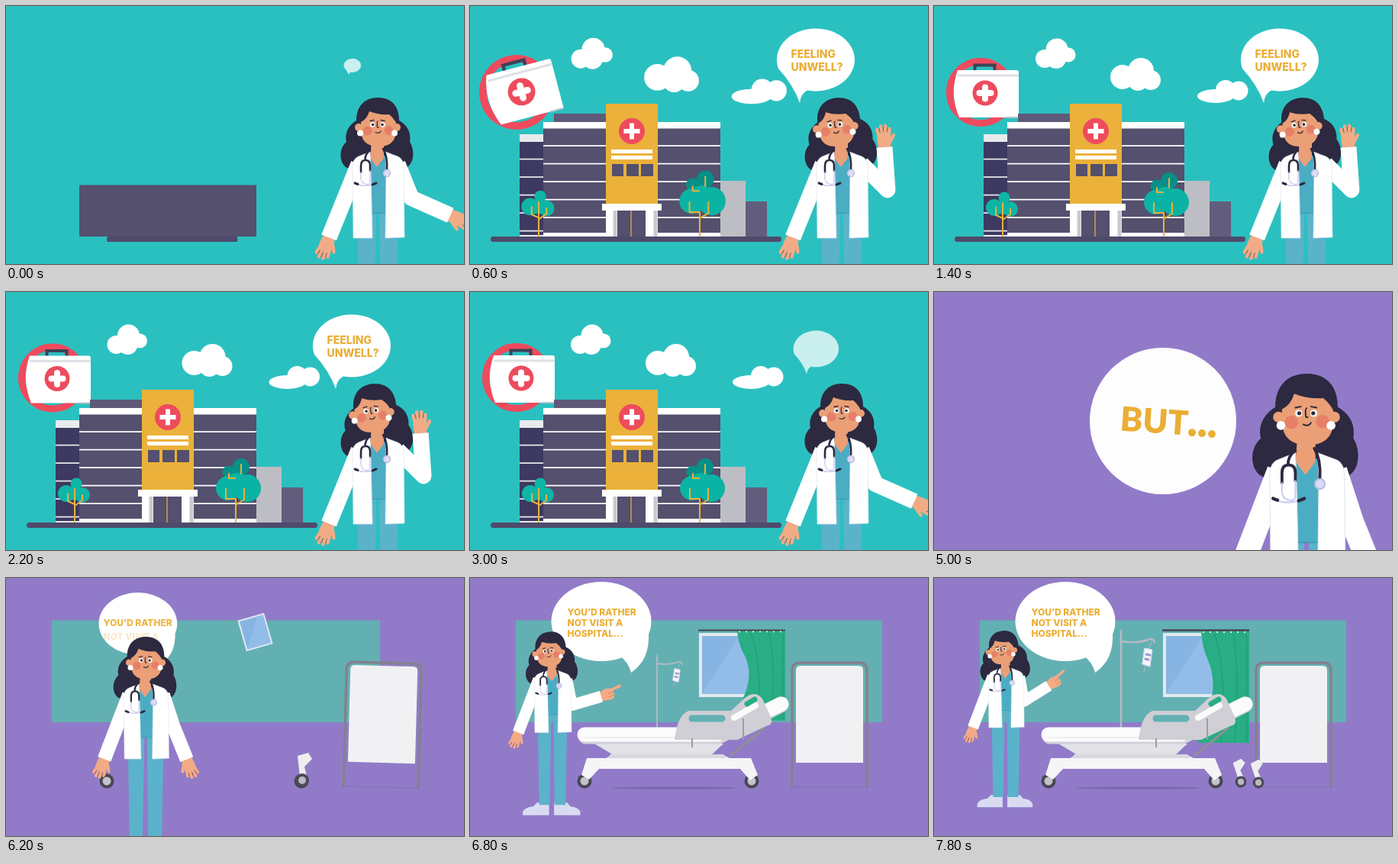
An HTML page for the animation above (8 s loop, 600 by 338 pixels).

```html
<!DOCTYPE html>
<html lang="en">
<head>
<meta charset="utf-8">
<title>Feeling unwell</title>
<style>
html, body { margin: 0; width: 100%; height: 100%; overflow: hidden; background: #917bc9; }
svg { display: block; width: 100%; height: 100%; }
text { fill: #ebae35; font-family: Inter, sans-serif; font-weight: 800; }
.line { fill: none; stroke-linecap: round; stroke-linejoin: round; }
.sleeve { fill: none; stroke: #fff; stroke-width: 21; stroke-linejoin: round; }
</style>
</head>
<body>
<svg viewBox="0 0 600 338">
<defs>
  <g id="hand">
    <path fill="#f3ab86" d="M-8 -1H8L9 12Q8 19 0 19T-9 12Z"/>
    <path class="line" stroke="#f3ab86" stroke-width="4.4" d="M-6 13L-8 24M-2 15L-3 28M2.500 15L3 28M6.500 12L8 24M7 5L13 15"/>
    <path class="line" stroke="#8d5a50" d="M-4.500 20L-5.500 25M0 21V27M5 20L5.500 25"/>
  </g>
  <g id="caster">
    <path fill="#eee" d="M-6 -32L8 -36L13 -28L3 -18L6 -4H-3Z"/>
    <circle r="9" fill="#4b4a55"/><circle r="5" fill="#b9b9c2"/>
  </g>
  <g id="wheel"><circle r="9.500" fill="#484751"/><circle r="5.500" fill="#c3c3ca"/></g>
</defs>

<g id="clinic">
  <rect width="600" height="338" fill="#2bc0c0"/>
  <g fill="#fff">
    <g id="cloud0"><circle cx="161" cy="57" r="14.500"/><circle cx="145" cy="69" r="12"/><circle cx="160" cy="69" r="13"/><circle cx="176" cy="64" r="9.500"/></g>
    <g id="cloud1"><circle cx="271" cy="85" r="17"/><circle cx="247" cy="93" r="16"/><circle cx="267" cy="98" r="13"/><circle cx="284" cy="97" r="13"/></g>
    <g id="cloud2"><circle cx="382" cy="110" r="13"/><circle cx="399" cy="111" r="12.500"/><ellipse cx="369" cy="118" rx="24" ry="9"/></g>
  </g>
  <g id="kit">
    <circle cx="61" cy="113" r="40.500" fill="none" stroke="#ee4b5d" stroke-width="9"/>
    <path d="M53.500 85V77.500H79.500V85" fill="none" stroke="#3c4258" stroke-width="4"/>
    <path fill="#fff" d="M31 84H108Q111 84 111 87V146H33Q20 115 31 84Z"/>
    <path d="M31 91H111" stroke="#dde1e6" stroke-width="3"/><path d="M94 146H110" stroke="#b7c3c9" stroke-width="2"/>
    <circle cx="67" cy="114" r="16.500" fill="#ee4b5d"/>
    <path class="line" stroke="#fff" stroke-width="8" d="M59.500 114H74.500M67 106.500V121.500"/>
  </g>
  <g id="sides">
    <rect x="65" y="168" width="32" height="134" fill="#e9eaee"/>
    <path d="M81 178V300" stroke="#3d3961" stroke-width="32" stroke-dasharray="21.700 1.800"/>
    <rect x="110" y="141" width="68" height="12" fill="#5f5a79"/>
    <rect x="328" y="229" width="33" height="73" fill="#bdbec4"/>
    <rect x="361" y="256" width="28" height="46" fill="#625d7c"/>
  </g>
  <g id="walls">
    <rect x="96" y="152" width="232" height="150" fill="#54506d"/>
    <g id="floors">
      <rect x="96" y="152" width="232" height="150" fill="#fff"/>
      <path d="M212 160.500V297" stroke="#54506d" stroke-width="232" stroke-dasharray="21.700 1.800"/>
    </g>
  </g>
  <g id="tower">
    <rect x="178" y="128" width="68" height="134" fill="#ebb13a"/>
    <circle cx="212" cy="164" r="17" fill="#ee4b5d"/>
    <path d="M201.500 164H222.500M212 153.500V174.500" stroke="#fff" stroke-width="6"/>
    <path d="M185 190.500H239M185 198.500H239" stroke="#fff" stroke-width="5"/>
    <path d="M186 215H201M205 215H221M224 215H240" stroke="#54506d" stroke-width="16"/>
    <rect x="178" y="267" width="68" height="35" fill="#fff"/>
    <rect x="193" y="267" width="37" height="35" fill="#54506d"/>
    <path d="M190 268V302M243 268V302" stroke="#c9cad0" stroke-width="5"/>
    <path d="M211 268V302" stroke="#d39a5c" stroke-width="1.500"/>
    <rect x="173" y="259" width="78" height="9" fill="#fff"/>
  </g>
  <g id="smallTree" fill="#0eb5a5">
    <circle cx="92" cy="251" r="7.500"/><circle cx="79" cy="264" r="11"/><circle cx="100" cy="266" r="10"/><circle cx="90" cy="264" r="9"/>
    <path class="line" stroke="#e9b13c" stroke-width="2" d="M90 301V258M81 264V274L90 278M100 266V273L90 280"/>
  </g>
  <g id="bigTree" fill="#0bb3a4">
    <circle cx="308" cy="229" r="11" fill="#078f88"/><circle cx="292" cy="236" r="8.500" fill="#078f88"/>
    <circle cx="291" cy="257" r="16"/><circle cx="316" cy="257" r="18"/><circle cx="303" cy="252" r="15"/>
    <path class="line" stroke="#e9b13c" stroke-width="2" d="M301 301V277M288 258V271H301V277M312 258V272L301 279M292 238V244H300M308 226V238"/>
  </g>
  <rect id="ground" x="27" y="302" width="381" height="7" rx="3.500" fill="#4f4a6b"/>
  <g id="askBubble">
    <path fill="#fff" d="M404 82Q424 104 432 127Q433 115 442 110.500A51 41 0 1 0 404 82Z"/>
    <g id="askText" font-size="14" style="font-weight: 900"><text x="420.500" y="68">FEELING</text><text x="420.500" y="84.500">UNWELL?</text></g>
  </g>
</g>

<g id="but">
  <circle id="flash" cx="300" cy="169" fill="#fff"/>
  <circle id="violet" cx="300" cy="169" fill="#917bc9"/>
  <circle id="disc" cx="300" cy="169" fill="#fdfdfe"/>
  <g id="butText">
    <text x="244" y="186" font-size="44" style="font-family: Lato, sans-serif; font-weight: 900">BUT</text>
    <g fill="#ebae35"><circle id="dot0" cx="339" cy="182" r="5"/><circle id="dot1" cx="352" cy="182" r="5"/><circle id="dot2" cx="365" cy="182" r="5"/></g>
  </g>
</g>

<g id="room">
  <rect id="wall" x="60" y="55.500" width="480" height="133.500" fill="#63b0b2"/>
  <g id="window">
    <rect x="302" y="74" width="68" height="80" fill="#86b5e3" stroke="#e4e9f0" stroke-width="4"/>
    <path d="M304 152L352 76H368V152Z" fill="#92bde8"/>
  </g>
  <g id="curtain">
    <path fill="#28ad84" d="M350 70H413V216H345Q352 196 359 176Q372 138 359 108Q351 90 350 70Z"/>
    <path class="line" stroke="#1f8f6d" stroke-dasharray="3 2" d="M368 74Q384 125 376 214M392 74Q401 130 394 214M410 76V214"/>
    <path d="M299 68.500H413" stroke="#45464f" stroke-width="2.500"/><path d="M352 71H411" stroke="#dceee7" stroke-width="2" stroke-dasharray="2 7"/>
  </g>
  <g id="screen">
    <path d="M422 275V121Q422 111 432 111H510Q520 111 520 121V275" fill="none" stroke="#83828e" stroke-width="3.500"/>
    <path d="M420 274H522" stroke="#8171b5"/>
    <path d="M427 242V121Q427 115 433 115H509Q515 115 515 121V242Z" fill="#f1f1f3"/>
  </g>
  <g id="drip" class="line" stroke="#b5bac2" stroke-width="2.500">
    <path d="M245 195V69M245 83Q266 86 280 81Q287 78 289 84"/>
    <path d="M285 84L281 94M277 115L275 123" stroke-width="1"/>
    <path d="M276 92L286 94L283 116L273 113Z" fill="#f4f4fb" stroke="#dad8ec" stroke-width="1"/><path d="M278 100L283 101M277 106L281 107" stroke="#9c9ad0" stroke-width="3"/>
  </g>
  <ellipse id="shade" cx="268" cy="275" rx="82" ry="1.800" fill="#7c69b0"/>
  <use id="wheelL" href="#wheel"/><use id="wheelR" href="#wheel"/>
  <use id="looseCaster" href="#caster" x="388" y="265"/>
  <g id="bed">
    <path d="M340 234L386 196" stroke="#8e8e98" stroke-width="3"/>
    <path fill="#e2e2e7" d="M163 217H332L316 232H188Z"/>
    <path fill="#f5f5f7" d="M153 236H178L188 231H330L340 236H368L377 258L367 265L354 250H169L156 264L146 258Z"/>
    <path fill="#d8d8de" d="M184 231H332L336 236H180Z"/>
    <path class="line" stroke="#d2d2d9" stroke-width="21" d="M152 207H326L407 166"/>
    <path class="line" stroke="#fbfbfc" stroke-width="19" d="M150 205H324L408 165"/>
    <path d="M150 209H320" stroke="#e4e4e9"/>
    <path fill="#cfcfd5" d="M268 212Q272 178 287 174H342L359 158Q373 146 383 158L393 180Q399 192 388 194L350 212Z"/>
    <path class="line" stroke="#63b0b2" stroke-width="9" d="M291 184H330"/>
    <path class="line" stroke="#fbfbfc" stroke-width="8" d="M346 183L374 167"/>
    <path class="line" stroke="#28ad84" stroke-width="7" d="M363 165L373 159"/>
    <path d="M291 210V222M358 184V212" stroke="#9c9ca5" stroke-width="2"/>
  </g>
  <g id="casters"><use href="#caster" transform="translate(402 267) scale(.82) rotate(-12)"/><use href="#caster" transform="translate(425 268) scale(.82) rotate(-12)"/></g>
  <g id="tellBubble" fill="#fff">
    <ellipse cx="172" cy="57" rx="65.500" ry="52"/>
    <path d="M192 98Q208 110 211 124Q236 107 234 72Z"/>
  </g>
  <g id="tellText" font-size="12"><text x="127.500">YOU’D RATHER</text><text x="127.500">NOT VISIT A</text><text x="127.500">HOSPITAL...</text></g>
</g>

<g id="doctor">
  <path id="hair" fill="#2c2940" d="M487 120C470 120 459 131 459 150C449 156 443 167 446 178C435 187 436 209 449 213C460 217 470 206 487 206C505 206 512 218 524 212C536 206 535 187 529 178C531 166 526 156 515 150C515 131 505 120 487 120Z"/>
  <path fill="#d9dcf1" d="M433 455V449Q437 440 452 439L459 432H481V455ZM538 455V449Q534 440 520 439L514 432H490V455Z"/>
  <path fill="#5bb3cb" d="M460 262H514L511 436H491L489 270H485L482 436H463Z"/>
  <path fill="#4badc3" d="M474 196H501L500 271H474Z"/><path d="M477 271.500H499" stroke="#3b98af"/>
  <path fill="#ea9f76" d="M479 176H495V199L486 211L477 199Z"/>
  <use id="handL" href="#hand"/><use id="handR" href="#hand"/>
  <g id="pointing">
    <path fill="#f3ab86" d="M-8 -1H8L11 10Q11 24 2 24H-5Q-12 22 -10 12Z"/>
    <path class="line" stroke="#f3ab86" stroke-width="5" d="M6 17L9 38"/>
    <path class="line" stroke="#c77c5d" d="M-5 14L-4 22M1 14L2 22"/>
  </g>
  <path class="sleeve" id="armL"/><path class="sleeve" id="armR"/>
  <g fill="#fff" stroke="#dfe4ef" stroke-width=".7">
    <path d="M477 191L462 197Q454 200 454 211L455 304H480L478 217Z"/>
    <path d="M497 191L513 197Q521 200 521 212L522 303L497 304L498 217Z"/>
  </g>
  <g class="line" stroke="#2c2940" stroke-width="2.600">
    <path d="M477 189Q470 194 470.500 202M465 218V209Q465 202 471 202T477 209V216M494 187Q500 197 499 214"/>
    <path d="M465 218Q464 230 468 232Q475 236 477 231V216M458 233Q470 238 483 233" stroke="#cbcdf0" stroke-width="1.400"/>
    <path d="M457 232L461 233.500M480 234L485 232" stroke-width="3"/>
    <circle cx="499" cy="219" r="4.500" fill="#dcdcf4" stroke="#b9bde3" stroke-width="1.500"/>
  </g>
  <g id="face">
    <g fill="#ea9f76">
      <circle cx="462" cy="159" r="5"/><circle cx="512" cy="159" r="5"/>
      <path d="M476 138Q488 143 502 142Q508 147 511 153V164Q510 184 488 184Q466 184 465 164V152Q473 148 476 138Z"/>
    </g>
    <g fill="#e77f68"><circle cx="473.500" cy="163.500" r="6"/><circle cx="501.500" cy="163" r="6"/></g>
    <g fill="#fff"><circle cx="464" cy="166.500" r="4"/><circle cx="509" cy="166.500" r="4"/><circle cx="480" cy="155.500" r="3.200"/><circle cx="493.500" cy="155.500" r="3.200"/></g>
    <g fill="#2c2940"><circle cx="480.500" cy="155.500" r="1.800"/><circle cx="493" cy="155.500" r="1.800"/></g>
    <path class="line" stroke="#2c2940" stroke-width="1.300" d="M477 150.500L482 149.500M491 149.500L496 150.500M487 151Q485.500 152 486.500 159H488M484 165.500Q489 168 491 164"/>
  </g>
</g>
</svg>
<script>
const LOOP = 8000, STEP = 200;
const $ = id => document.getElementById(id);
const set = (id, name, value) => $(id).setAttribute(name, value);
const show = (id, on) => set(id, 'display', on ? 'inline' : 'none');
const mix = (a, b, p) => a + (b - a) * p;

let t = 0;
const progress = (from, to) => Math.min(1, Math.max(0, (t - from) / (to - from)));
const ease = (from, to) => { const p = progress(from, to); return p * p * (3 - 2 * p); };
const pop = (from, to) => { const q = progress(from, to) - 1; return 1 + 2.7 * q ** 3 + 1.7 * q ** 2; };

function place(id, cx, cy, { sx = 1, sy = sx, rot = 0, dx = 0, dy = 0 }) {
  set(id, 'transform', `translate(${cx + dx} ${cy + dy}) rotate(${rot}) scale(${sx} ${sy}) translate(${-cx} ${-cy})`);
}

// Arm angles are in degrees from straight down, positive to the right.
const rest = { x: 487, y: 120, size: 1, tilt: 0, left: -22, upper: 22, fore: 66 };
const wave = { ...rest, tilt: -5, upper: 45, fore: 184 };
const close = { ...rest, x: 488, y: 107, size: 1.46, left: -21, upper: 18, fore: 22 };
const stand = { ...close, x: 183, y: 77, size: .87 };
const point = { ...stand, x: 94, y: 69, size: .69, tilt: -5, upper: 10, fore: 122 };
const moves = [[0, 600, wave], [2400, 3000, rest], [3100, 3800, close], [5200, 6200, stand], [6200, 7000, point]];

function arm(side, x, y, upper, fore) {
  const reach = (angle, length) => [Math.sin(angle * Math.PI / 180) * length, Math.cos(angle * Math.PI / 180) * length];
  const [ux, uy] = reach(upper, 48), [fx, fy] = reach(fore, 56);
  const ex = x + ux, ey = y + uy, wrist = `${ex + fx} ${ey + fy}`;
  set('arm' + side, 'd', `M${x} ${y}L${ex} ${ey}L${wrist}`);
  const grip = `translate(${wrist}) rotate(${-fore})`;
  set('hand' + side, 'transform', grip + (side === 'R' ? ' scale(-1 1)' : ''));
  if (side === 'R') set('pointing', 'transform', grip);
}

function drawDoctor() {
  const pose = { ...rest };
  for (const [from, to, goal] of moves)
    for (const part in pose) pose[part] = mix(pose[part], goal[part], ease(from, to));
  const waving = t > 600 && t < 2400 ? 10 * Math.sin((t - 1400) * Math.PI / 400) : 0;
  place('doctor', 487, 120, { sx: pose.size, dx: pose.x - 487, dy: pose.y - 120 });
  set('hair', 'transform', `rotate(${pose.tilt} 487 195)`);
  set('face', 'transform', `translate(${pose.tilt}) rotate(${pose.tilt} 487 195)`);
  arm('L', 462, 207, pose.left, pose.left);
  arm('R', 513, 207, pose.upper, pose.fore + waving);
  show('handR', t < 6800);
  show('pointing', t >= 6800);
}

function drawClinic() {
  show('clinic', t < 3600);
  const risen = mix(.45, 1, ease(0, 400));
  place('ground', 218, 302, { sx: risen, sy: 1 });
  place('walls', 212, 302, { sx: 1, sy: risen });
  show('floors', t >= 200);
  for (const id of ['sides', 'tower']) place(id, 212, 302, { sx: 1, sy: ease(100, 600) });
  place('smallTree', 90, 302, { sx: pop(400, 900) });
  place('bigTree', 301, 302, { sx: pop(400, 900) });
  place('kit', 61, 113, { sx: pop(300, 900), rot: -20 * (1 - ease(400, 1000)), dy: -ease(1400, 3000) });
  for (let i = 0; i < 3; i++)
    place('cloud' + i, 160 + i * 109, 63 + i * 25, { sx: pop(100 + i * 100, 700 + i * 100), dx: (1400 - t) / 1600 });
  const shrink = ease(2720, 3350);
  place('askBubble', 454, 80, { sx: mix(.22, 1, ease(0, 500)) * (1 - shrink) });
  set('askBubble', 'opacity', mix(.75, 1, ease(0, 300) - ease(2700, 3000)));
  set('askText', 'opacity', ease(200, 600) - ease(2600, 2900));
}

function drawBut() {
  show('but', t >= 3400 && t < 5600);
  const leave = 1 - ease(5200, 5600);
  set('flash', 'r', Math.max(0, t - 3200));
  set('violet', 'r', Math.max(0, .58 * (t - 3255)));
  set('disc', 'r', 96 * pop(3400, 3900) * leave);
  place('butText', 308, 170, {
    sx: mix(.65, 1, ease(3400, 4000)) * ease(3400, 3600) * leave,
    rot: 4 * Math.cos((t - 5000) * Math.PI / 800)
  });
  for (let i = 0; i < 3; i++) {
    const grown = ease(3450 + i * 100, 3800 + i * 100);
    place('dot' + i, 339 + i * 13, 182, { sx: Math.sqrt(grown) });
    set('dot' + i, 'opacity', grown);
  }
}

function drawRoom() {
  show('room', t >= 5400);
  place('wall', 60, 122, { sx: ease(5400, 6400), sy: 1 });
  const opened = ease(5900, 6500), away = 1 - opened;
  place('window', 335, 114, { sx: opened, rot: -32 * away, dx: -18 * away, dy: -86 * away });
  place('curtain', 413, 68, { sx: ease(6300, 6800), sy: ease(6300, 7000) });
  const offstage = 1 - ease(5600, 6400);
  place('screen', 470, 275, { dx: 128 * offstage, rot: 10 * offstage });
  place('drip', 245, 195, { sx: ease(6400, 7000) });
  const spread = 18 * (1 - ease(6200, 6600));
  place('wheelL', 0, 0, { dx: 150 - spread, dy: 266 });
  place('wheelR', 0, 0, { dx: 369 + spread, dy: 266 });
  show('wheelL', t >= 6000);
  show('wheelR', t >= 6000);
  show('looseCaster', t >= 6000 && t < 6400);
  place('bed', 258, 235, { sx: ease(6200, 6800) });
  place('shade', 268, 275, { sx: ease(6200, 6800) });
  show('casters', t >= 7600);
  place('tellBubble', 176, 70, { sx: ease(5850, 6350) });
  [...$('tellText').children].forEach((line, i) => {
    line.setAttribute('opacity', ease(6000 + i * 120, 6240 + i * 120));
    line.setAttribute('y', 49 + i * 14 + (14 + i * 4) * (1 - ease(6200, 6600)));
  });
}

function frame() {
  t = Math.floor(performance.now() % LOOP / STEP) * STEP;
  drawClinic();
  drawBut();
  drawRoom();
  drawDoctor();
  requestAnimationFrame(frame);
}
frame();
</script>
</body>
</html>
```
